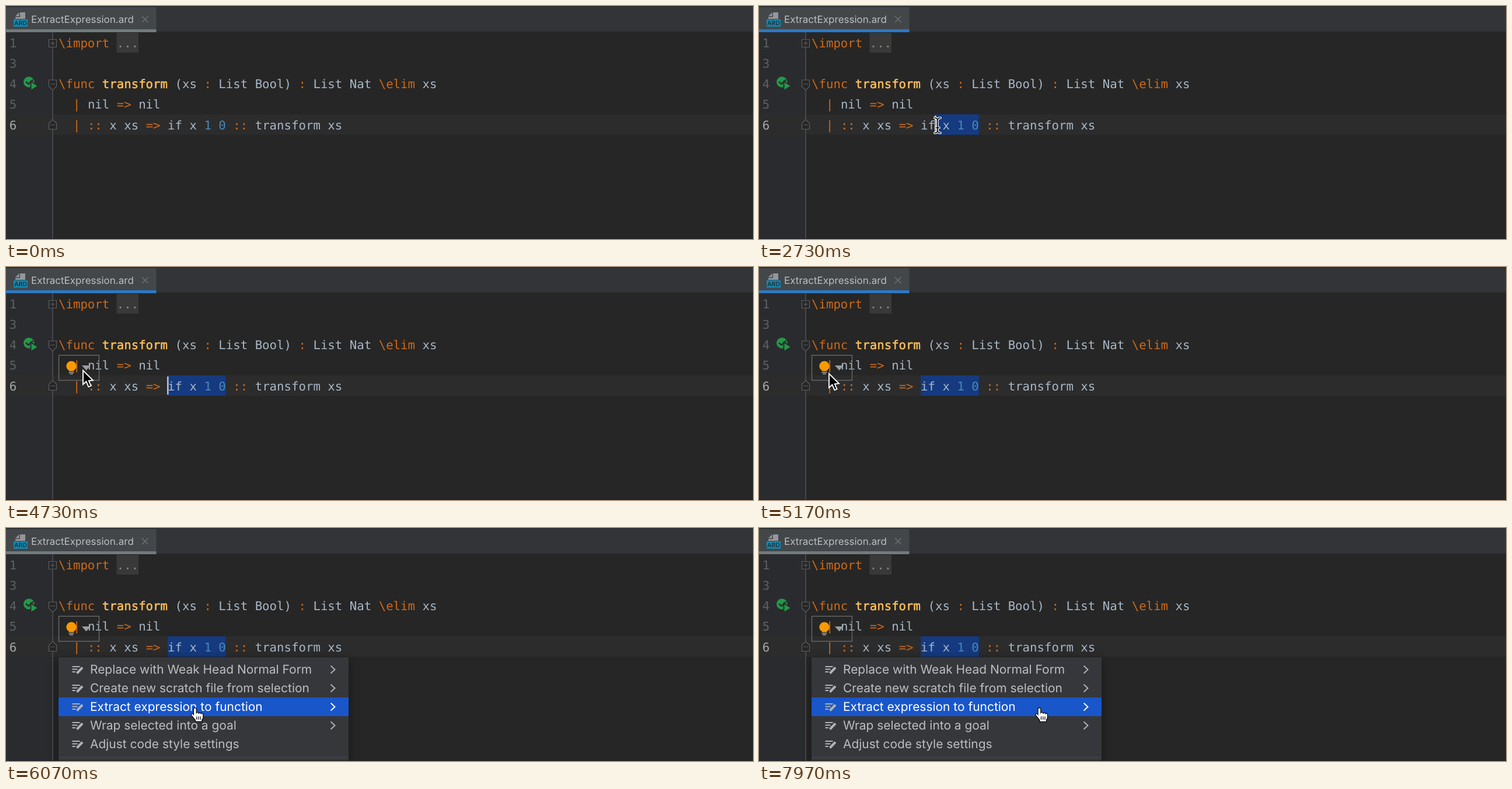
Animation, 1280 px wide and 400 px high, one loop 8 s. Source, as an HTML page:

```html
<!DOCTYPE html>
<html lang="en">
<head>
<meta charset="utf-8">
<title>Extract expression</title>
<style>
  html, body { margin: 0; width: 100%; height: 100%; overflow: hidden; background: #262626; }
  svg { display: block; }
  text { white-space: pre; text-rendering: geometricPrecision; }
  .code text { font: 20.71px "DejaVu Sans Mono", "Noto Sans Mono", monospace; font-variant-ligatures: none; fill: #a9b7c6; }
  .code .key { fill: #cf6a17; }
  .code .num { fill: #4a89b9; }
  .code .fn { fill: #ffc05a; stroke: #ffc05a; stroke-width: .5; }
  .code .line { fill: #5d6164; }
  .code .now { fill: #a6a8aa; }
  .code .dots { fill: #858b86; }
  .ui { font-family: Inter, Roboto, sans-serif; fill: #bcbec1; }
  .fold { fill: #262626; stroke: #5c5e60; stroke-width: 1.2; }
  .shade { filter: drop-shadow(0 4px 9px rgba(0, 0, 0, .4)); }
  .item text { font-size: 20.95px; }
  .item path { fill: none; stroke: #b0b2b5; stroke-width: 1.9; }
  .item .pen { stroke-width: 4; }
  .item.on text { fill: #fff; }
  .item.on .chevron { stroke: #fff; }
  #beam path { fill: none; stroke: #fff; stroke-width: 4; stroke-linecap: round; }
  #beam .core { stroke: #000; stroke-width: 1.7; }
</style>
</head>
<body>
<svg width="1280" height="400" viewBox="0 0 1280 400">
  <rect width="1280" height="400" fill="#262626"/>
  <rect y="45" width="80" height="355" fill="#2a2b2e"/>
  <rect y="186" width="1280" height="35" fill="#2c2c2d"/>

  <!-- tab bar -->
  <rect width="1280" height="44" fill="#333437"/>
  <rect width="1280" height="1" fill="#28292b"/>
  <rect y="43.5" width="1280" height="1" fill="#292a2c"/>
  <rect y="2" width="257.5" height="38" fill="#43474a"/>
  <rect id="underline" y="40" width="257.5" height="5"/>
  <path d="M24 11h9v11H16v-3h8zM22.5 11v6.5H16z" fill="#93979b"/>
  <rect x="13" y="23" width="24" height="12.5" fill="#1289b2"/>
  <text class="ui" x="25" y="33.2" font-size="10.5" font-weight="600" text-anchor="middle" style="fill:#1f3038">ARD</text>
  <text class="ui" x="43" y="28.7" font-size="17">ExtractExpression.ard</text>
  <path d="M233 17.5l10.5 10.5m0-10.5l-10.5 10.5" stroke="#707376" stroke-width="1.3"/>

  <!-- gutter -->
  <path d="M80 45V400" stroke="#555759" stroke-width="1.3"/>
  <g class="fold">
    <path d="M73.5 57.5h13v13h-13zM76 64h8M80 60v8"/>
    <path d="M73.5 127h13v11l-6.5 6.5l-6.5-6.5zM76 134h8"/>
    <path d="M73.5 211.5v-10.5l6.5-6l6.5 6v10.5zM76 204h8"/>
  </g>
  <circle cx="39.3" cy="130.5" r="9.3" fill="#24984a"/>
  <path d="M34 130l4.5 4l8-7.5" fill="none" stroke="#2a2b2e" stroke-width="2.4"/>
  <path d="M43.5 131l10 6.3l-10 6.3z" fill="#24984a" stroke="#2a2b2e" stroke-width="4" paint-order="stroke"/>

  <!-- editor -->
  <rect id="selection" y="186" height="35" fill="#153a80"/>
  <rect x="189.5" y="46" width="37.5" height="34" fill="#383938"/>
  <g id="code" class="code"></g>
  <rect id="caret" y="188" width="2.5" height="31" fill="#c4c6c8"/>

  <!-- intention bulb -->
  <g id="bulb">
    <path d="M108 178.7v-1a8.6 8.6 0 1 1 8 0v1z" fill="#f79a05"/>
    <path d="M107.500 180.800h9M109 183.500h6" stroke="#a9abad" stroke-width="1.5"/>
  </g>
  <g id="panel">
    <rect x="90.5" y="151.5" width="69" height="43" fill="none" stroke="#6c6d6e" stroke-width="1.3"/>
    <path d="M130 169h15l-7.5 8.5z" fill="#9b9da0"/>
  </g>

  <!-- popup -->
  <g id="menu">
    <rect class="shade" x="90" y="222" width="497" height="200" fill="#36373a"/>
    <rect x="90" y="393" width="497" height="1.5" fill="#45464a"/>
    <rect id="bar" x="90" width="497" height="32" fill="#1856ca"/>
    <g id="items" class="ui"></g>
  </g>
  <rect y="399" width="1280" height="1" fill="#202123"/>

  <!-- pointers -->
  <g id="beam">
    <path d="M-5-13Q-.5-13 0-9Q.5-13 5-13M0-9V9M-5 13Q-.5 13 0 9Q.5 13 5 13M-3 4h6"/>
    <path class="core" d="M-5-13Q-.5-13 0-9Q.5-13 5-13M0-9V9M-5 13Q-.5 13 0 9Q.5 13 5 13M-3 4h6"/>
  </g>
  <path id="arrow" d="M0 0V24L5.5 19L9.5 28.3L13.5 26.5L9.8 17.8L17 17Z" fill="#000" stroke="#fff" stroke-width="1.9"/>
  <g id="hand" stroke="#000" stroke-width="1.2">
    <path fill="#fff" d="M-2 2.5a2.4 2.4 0 0 1 4.8 0V9a2.2 2.2 0 0 1 4 .7a2.2 2.2 0 0 1 4 .7a2 2 0 0 1 3.6 .8V16q0 3-2 5V24H1V21.5L-5.5 13.5q-1.5-2.5 .6-3.2q1.5-.3 2.9 1.7Z"/>
    <path d="M3.5 15v5.5M6.8 15v5.5M10 15v5.5"/>
  </g>
</svg>
<script>
const LOOP = 8000, FRAME = 1000 / 30;
const LEFT = 90, CHAR = 12.47, BASE = 70.8, PITCH = 35.2;
const FOCUS = 1930, DRAG_END = 3000, BULB = 3300, OPEN = 5200;
const SEL_FIRST = 15, SEL_LAST = 23;
const ROW_TOP = 227, ROW = 32;
const $ = id => document.getElementById(id);
const colX = col => LEFT + col * CHAR;

// Each row: line number, then [column, text, class]
const rows = [
  [1, [0, "\\import", "key"], [8, "...", "dots"]],
  [3],
  [4, [0, "\\func", "key"], [6, "transform", "fn"], [16, "(xs"], [20, ":", "key"], [22, "List Bool)"],
    [33, ":", "key"], [35, "List Nat"], [44, "\\elim", "key"], [50, "xs"]],
  [5, [2, "|", "key"], [4, "nil"], [8, "=>", "key"], [11, "nil"]],
  [6, [2, "|", "key"], [4, "::", "key"], [7, "x xs"], [12, "=>", "key"], [15, "if x"], [20, "1", "num"],
    [22, "0", "num"], [24, "::", "key"], [27, "transform xs"]]
];
$("code").innerHTML = rows.map(([number, ...tokens], i) => {
  const y = BASE + i * PITCH;
  const put = (x, text, cls = "") => `<text x="${x}" y="${y}" class="${cls}">${text}</text>`;
  return put(5.8, number, number === 6 ? "now" : "line") +
    tokens.map(([col, text, cls]) => put(colX(col), text.replace(">", "&gt;"), cls)).join("");
}).join("");

const labels = ["Replace with Weak Head Normal Form", "Create new scratch file from selection",
  "Extract expression to function", "Wrap selected into a goal", "Adjust code style settings"];
$("items").innerHTML = labels.map((label, i) => `
  <g class="item" transform="translate(0 ${ROW_TOP + ROW * (i + .5)})">
    <path d="M113.5-5h13M113.5-.5h9M113.5 4h5.5"/>
    <path class="pen" d="M131-3.500L121.500 6.500"/>
    <text x="144" y="7.2">${label}</text>
    ${i < 4 ? '<path class="chevron" d="M556.5-6.5l7 6.5l-7 6.5"/>' : ""}
  </g>`).join("");
const items = [...document.querySelectorAll(".item")];

// Pointer stops: time, x, y
const path = [
  [970, 450, 345], [1530, 382, 204], [1730, 382, 204], [1770, 377, 204], [1970, 377, 204],
  [2730, 306, 205], [DRAG_END, 279, 206], [3400, 270, 215], [3700, 262, 216], [4350, 132, 177.5],
  [4800, 132, 177.5], [5100, 120, 183], [5740, 120, 183], [6070, 323.5, 308.5], [6500, 324.5, 311],
  [7500, 325.5, 311], [7800, 325.5, 308.5], [7965, 480, 308.5]
];
const ease = p => p * p * (3 - 2 * p);

function pointerAt(t) {
  const next = path.findIndex(stop => stop[0] > t);
  if (next === 0) return path[0].slice(1);
  if (next < 0) return path[path.length - 1].slice(1);
  const [t0, x0, y0] = path[next - 1], [t1, x1, y1] = path[next];
  const p = ease((t - t0) / (t1 - t0));
  return [x0 + (x1 - x0) * p, y0 + (y1 - y0) * p];
}

function show(id, on) { $(id).style.display = on ? "" : "none"; }

function draw(ms) {
  const t = Math.floor((ms + 4) / FRAME) * FRAME;
  const [x, y] = pointerAt(t);
  const focused = t >= FOCUS && t < OPEN, open = t >= OPEN;
  const overBulb = t >= BULB && x < 160 && y < 195;
  const inMenu = open && y >= ROW_TOP;

  const kind = t < path[0][0] - 4 ? "" : inMenu ? "hand" : open || overBulb ? "arrow" : "beam";
  for (const id of ["beam", "arrow", "hand"]) {
    show(id, id === kind);
    $(id).setAttribute("transform", `translate(${x} ${y})`);
  }

  const col = t >= DRAG_END ? SEL_FIRST : Math.round((x - LEFT) / CHAR);
  const start = t < FOCUS ? SEL_LAST : Math.max(SEL_FIRST, Math.min(SEL_LAST, col));
  $("selection").setAttribute("x", colX(start));
  $("selection").setAttribute("width", (SEL_LAST - start) * CHAR);
  $("caret").setAttribute("x", colX(start) - 1);
  show("caret", focused && (t < DRAG_END || (t - 2600) % 1000 < 500));
  $("underline").setAttribute("fill", focused ? "#2b7ac6" : "#737a7d");

  show("bulb", t >= BULB);
  show("panel", overBulb || open);
  show("menu", open);
  const active = inMenu ? Math.floor((y - ROW_TOP) / ROW) : 0;
  $("bar").setAttribute("y", ROW_TOP + active * ROW);
  items.forEach((item, i) => item.classList.toggle("on", i === active));
}

function tick() {
  draw(performance.now() % LOOP);
  requestAnimationFrame(tick);
}
tick();
</script>
</body>
</html>
```
